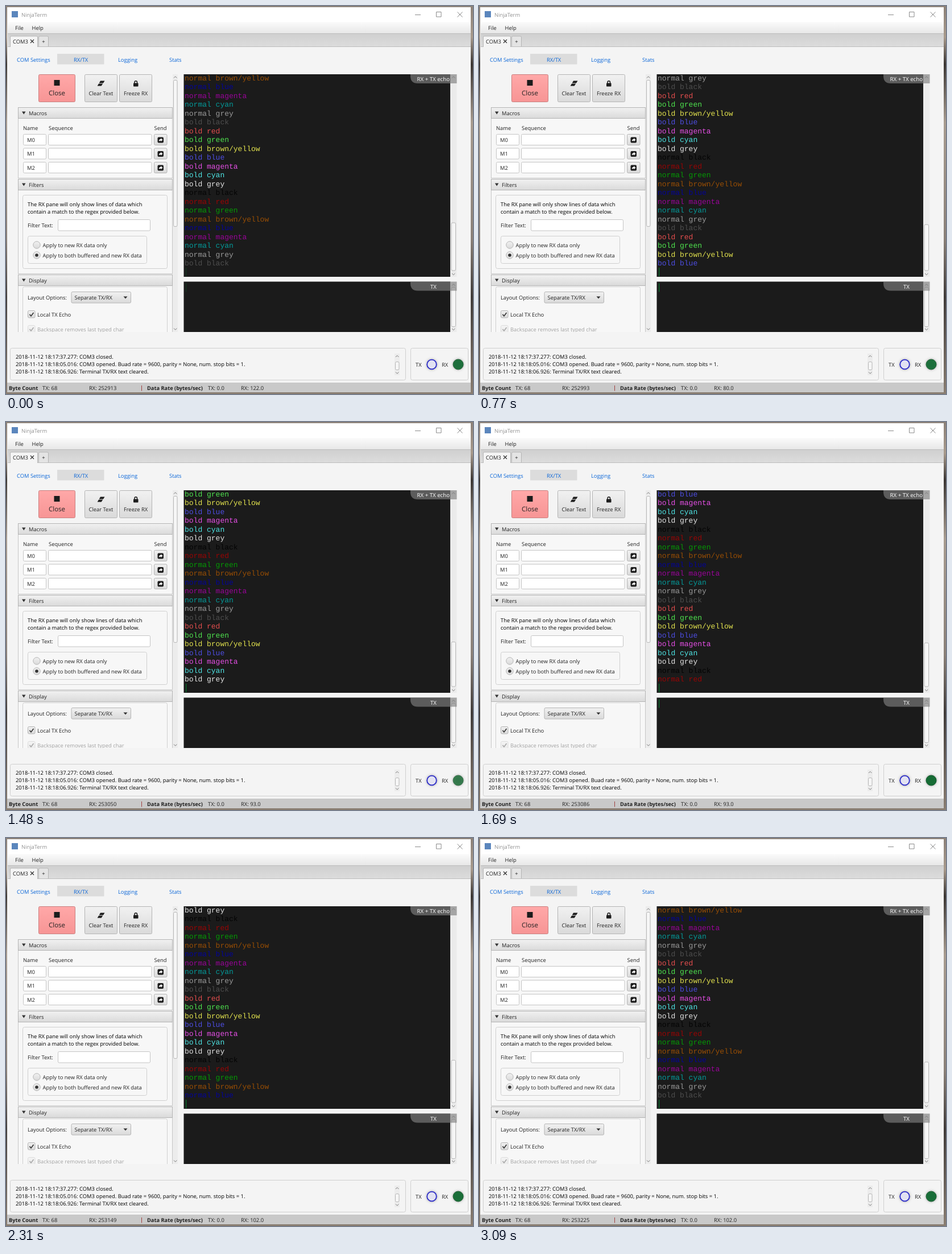
An HTML page for the animation above (3180 ms loop, 821x682 px).

```html
<!DOCTYPE html>
<html lang="en">
<head>
<meta charset="utf-8">
<title>NinjaTerm</title>
<style>
html, body { margin: 0; width: 100%; height: 100%; overflow: hidden; }
body > svg { display: block; }
text { font: 9.4px "Open Sans", "Noto Sans", sans-serif; fill: #222; text-rendering: geometricPrecision; white-space: pre; }
.mid { text-anchor: middle; }
.link { fill: #0a66d8; }
.dark { fill: #000; }
.bold { font-size: 9.25px; font-weight: 700; }
.tag { font-size: 9.7px; fill: #fff; }
#rows text { font: 13px "Liberation Mono", "Courier New", monospace; opacity: .88; }
.btn { fill: url(#btn); stroke: #b4b4b4; }
.field { fill: #fff; stroke: #c4c4c4; }
.box { fill: none; stroke: #cfcfcf; }
.thumb { fill: #f6f6f6; stroke: #b6b6b6; }
.arrow { fill: none; stroke: #777; }
.icon { fill: #1c1c1c; }
.caret { fill: #087a30; }
</style>
</head>
<body>
<svg id="stage" width="821" height="682" viewBox="0 0 821 682">
  <defs>
    <linearGradient id="desk" x2="0" y2="1">
      <stop stop-color="#8c8178"/><stop offset=".08" stop-color="#a89a8c"/>
      <stop offset=".15" stop-color="#3a3532"/><stop offset=".3" stop-color="#a89c90"/>
      <stop offset=".6" stop-color="#8a8078"/><stop offset=".75" stop-color="#3f3a38"/>
      <stop offset="1" stop-color="#8a7e72"/>
    </linearGradient>
    <linearGradient id="btn" x2="0" y2="1"><stop stop-color="#f1f1f1"/><stop offset="1" stop-color="#dadada"/></linearGradient>
    <linearGradient id="red" x2="0" y2="1"><stop stop-color="#ffa8a8"/><stop offset="1" stop-color="#f79595"/></linearGradient>
    <linearGradient id="menu" x2="0" y2="1"><stop stop-color="#fbfbfb"/><stop offset="1" stop-color="#e7e7e7"/></linearGradient>
    <linearGradient id="tabs" x2="0" y2="1"><stop stop-color="#cfcfcf"/><stop offset="1" stop-color="#dcdcdc"/></linearGradient>
    <filter id="glow" x="-50%" y="-50%" width="200%" height="200%">
      <feDropShadow dx="0" dy="0" stdDeviation="2" flood-color="#555" flood-opacity=".55"/>
    </filter>
  </defs>

  <!-- Window, title, menu and tabs -->
  <rect width="821" height="682" fill="url(#desk)"/>
  <rect x="2" y="2" width="815" height="677" fill="#f4f4f4"/>
  <rect x="3" y="3" width="814" height="25" fill="#fff"/>
  <rect x="10" y="9" width="11" height="11" fill="#5b86bd"/>
  <text x="27" y="18.5" style="fill:#8f8f8f">NinjaTerm</text>
  <path d="M719 15.5h10M756.500 10.500h8.500v8.500h-8.500zM793.500 10.500l9 9m0-9l-9 9" fill="none" stroke="#8a8a8a"/>
  <rect x="3" y="28" width="814" height="20" fill="url(#menu)"/>
  <text x="16" y="41.500">File</text><text x="45.500" y="41.500">Help</text>
  <rect x="3" y="48" width="814" height="23" fill="url(#tabs)"/>
  <path d="M3 48.500h814M3 71.500h814" stroke="#bcbcbc"/>
  <path d="M7.500 72v-17q0-2 2-2h44q2 0 2 2v17" fill="#f4f4f4" stroke="#b4b4b4"/>
  <path d="M57.500 71v-16q0-2 2-2h13q2 0 2 2v16" fill="#e4e4e4" stroke="#b4b4b4"/>
  <text x="12" y="65.500">COM3</text>
  <path d="M43 59l6 6m0-6l-6 6" stroke="#333" stroke-width="1.300"/>
  <text x="66" y="66" class="mid">+</text>
  <rect x="90" y="84" width="82.500" height="18.500" fill="#dcdcdc"/>
  <text class="link" x="19" y="97.500">COM Settings</text>
  <text class="link" x="119" y="97.500">RX/TX</text>
  <text class="link" x="197" y="97.500">Logging</text>
  <text class="link" x="287" y="97.500">Stats</text>

  <!-- Left panel, cut off at its lower edge -->
  <svg width="310" height="573">
    <rect x="57.500" y="120.500" width="64" height="48" rx="2" fill="url(#red)" stroke="#c98080"/>
    <rect class="btn" x="138.500" y="120.500" width="57" height="48" rx="2"/>
    <rect class="btn" x="199.500" y="120.500" width="57" height="48" rx="2"/>
    <path class="icon" d="M84.500 130h10v10h-10zM166 131.500h7.500l-2.500 4h-7.300zM163 136.500h7.300l-2.700 4h-7z"/>
    <rect class="icon" x="224" y="135.500" width="8.500" height="6" rx=".8"/>
    <path d="M226 136v-2a2.250 2.250 0 0 1 4.500 0v2" fill="none" stroke="#1c1c1c" stroke-width="1.500"/>
    <text class="mid" x="89.500" y="157" style="font-size:11.500px">Close</text>
    <text class="mid" x="167" y="156.500">Clear Text</text>
    <text class="mid" x="228" y="156.500">Freeze RX</text>
    <g id="panes"></g>
    <text x="30" y="217.500">Name</text><text x="75" y="217.500">Sequence</text><text x="260.500" y="217.500">Send</text>
    <g id="macros"></g>
    <rect class="box" x="29.500" y="332.500" width="254" height="129" rx="3"/>
    <text class="dark" x="38" y="351.500">The RX pane will only show lines of data which</text>
    <text class="dark" x="38" y="364.500">contain a match to the regex provided below.</text>
    <text x="38" y="389">Filter Text:</text>
    <rect class="field" x="91.500" y="375.500" width="162" height="19.500" rx="2"/>
    <rect class="box" x="38.500" y="404.500" width="209" height="48" rx="3"/>
    <circle class="btn" cx="54" cy="420" r="6.200"/><circle class="btn" cx="54" cy="438" r="6.200"/>
    <circle cx="54" cy="438" r="2.800" fill="#333"/>
    <text x="64.500" y="423.500">Apply to new RX data only</text>
    <text x="64.500" y="441.500">Apply to both buffered and new RX data</text>
    <rect class="box" x="29.500" y="493.500" width="254" height="110" rx="3"/>
    <text x="38" y="516">Layout Options:</text>
    <rect class="btn" x="115" y="502.500" width="104.500" height="19.500" rx="2"/>
    <text x="120.500" y="516">Separate TX/RX</text>
    <path d="M206.500 510.500h7l-3.500 4z" fill="#333"/>
    <g id="checks"></g>
    <rect x="293" y="120" width="9" height="453" fill="#ececec"/>
    <rect class="thumb" x="294.500" y="130.500" width="6.500" height="257" rx="2"/>
    <path class="arrow" d="M295 126.500l2.700-2.700 2.700 2.700M295 566.500l2.700 2.700 2.700-2.700"/>
  </svg>

  <!-- Terminals -->
  <rect x="312.500" y="120" width="469" height="356" fill="#1b1b1b"/>
  <rect x="312.500" y="484.500" width="469" height="88.500" fill="#1b1b1b"/>
  <g id="rows"></g>
  <rect class="caret" id="rxCaret" x="316" y="460" width="1.200" height="15"/>
  <rect class="caret" id="txCaret" x="316" y="487.500" width="1.200" height="15"/>
  <rect x="781" y="120" width="11.500" height="356" fill="#ebebeb"/>
  <rect x="781" y="484.500" width="11.500" height="88.500" fill="#ebebeb"/>
  <rect class="thumb" id="rxThumb" x="783" y="381" width="7.500" height="84" rx="2"/>
  <rect class="thumb" x="783" y="494.500" width="7.500" height="69" rx="2"/>
  <path class="arrow" d="M784 126.500l2.700-2.700 2.700 2.700M784 470l2.700 2.700 2.700-2.700M784 491.500l2.700-2.700 2.700 2.700M784 567l2.700 2.700 2.700-2.700"/>
  <path d="M711 120h81.500v16h-68.500q-13 0-13-13zM711 484.500h81.500v16h-68.500q-13 0-13-13z" fill="#808080" fill-opacity=".65"/>
  <text class="tag" x="780" y="132" text-anchor="end">RX + TX echo</text>
  <text class="tag mid" x="751.500" y="496.500">TX</text>

  <!-- Log, lamps and status bar -->
  <rect class="box" x="7.500" y="601.500" width="695" height="56" rx="3"/>
  <rect class="box" x="711.500" y="601.500" width="101" height="56" rx="3"/>
  <text class="dark" x="17" y="619.500">2018-11-12 18:17:37.277: COM3 closed.</text>
  <text class="dark" x="17" y="632.500">2018-11-12 18:18:05.016: COM3 opened. Buad rate = 9600, parity = None, num. stop bits = 1.</text>
  <text class="dark" x="17" y="645.500">2018-11-12 18:18:06.926: Terminal TX/RX text cleared.</text>
  <rect x="683" y="611" width="9" height="38" fill="#ececec"/>
  <rect class="thumb" x="684.500" y="625.500" width="6.500" height="14" rx="2"/>
  <path class="arrow" d="M685 617l2.700-2.700 2.700 2.700M685 643.500l2.700 2.700 2.700-2.700"/>
  <text x="720" y="633.500">TX</text><text x="766" y="633.500">RX</text>
  <circle cx="748.500" cy="630" r="8.300" fill="#e2e2f2" stroke="#2a2ac8" stroke-width="1.800" filter="url(#glow)"/>
  <g filter="url(#glow)"><circle id="lamp" cx="795" cy="630" r="9" fill="#126c34" stroke="#0e5a2a"/></g>
  <rect x="2" y="662" width="815" height="17" fill="#c9c9c9"/>
  <text class="bold" x="5" y="674.500">Byte Count</text><text x="64" y="674.500">TX: 68</text>
  <text id="count" x="146" y="674.500"></text>
  <path d="M238.500 667v9.500" stroke="#a04040"/>
  <text class="bold" x="248" y="674.500">Data Rate (bytes/sec)</text><text x="355" y="674.500">TX: 0.0</text>
  <text id="rate" x="413" y="674.500"></text>
</svg>
<script>
const $ = id => document.getElementById(id);
const LOOP = 3180, STEP = 77.3, LINE_MS = 195, LEAD = 55, ROWS = 22, FIRST = 8;

$('panes').innerHTML = [['Macros', 178, 303], ['Filters', 304, 471], ['Display', 472, 600]].map(([name, y, end]) => `
  <rect x="21.5" y="${y + .5}" width="271" height="${end - y - 1}" fill="#f7f7f7" stroke="#c6c6c6"/>
  <rect class="btn" x="21.5" y="${y + .5}" width="271" height="19"/>
  <path d="M28 ${y + 7.5}h6.500l-3.200 5z" fill="#333"/>
  <text x="40" y="${y + 13.5}">${name}</text>`).join('');

$('macros').innerHTML = [0, 1, 2].map(i => `<g transform="translate(0 ${225 + i * 24.5})">
  <rect class="field" x="30.500" y=".5" width="40" height="19" rx="2"/>
  <text x="37" y="13.500">M${i}</text>
  <rect class="field" x="74.500" y=".5" width="181.500" height="19" rx="2"/>
  <rect class="btn" x="260.500" y=".5" width="22.500" height="19" rx="2"/>
  <rect class="icon" x="266.500" y="5.500" width="10.500" height="10" rx="2"/>
  <path d="M269 13q-.5-4 3-4v-1.800l3.500 3-3.500 3v-1.800q-2-.2-3 1.600z" fill="#fff"/></g>`).join('');

$('checks').innerHTML = [['Local TX Echo', 542, 1], ['Backspace removes last typed char', 568, .4]].map(([label, y, alpha]) => `
  <g opacity="${alpha}"><rect class="btn" x="38.500" y="${y - 6.500}" width="12.500" height="12.500" rx="2"/>
  <path d="M41.500 ${y}l2.500 3 4.500-6" fill="none" stroke="#333" stroke-width="1.600"/>
  <text x="55" y="${y + 3.500}">${label}</text></g>`).join('');

// Sixteen terminal colours, in the order the device sends them
const names = ['black', 'red', 'green', 'brown/yellow', 'blue', 'magenta', 'cyan', 'grey'];
const palette = Array.from({length: 16}, (_, i) => {
  const bold = i > 7, low = bold ? 85 : 0, high = bold ? 255 : 170;
  const rgb = [1, 2, 4].map(bit => i & bit ? high : low);
  if (i === 3) rgb[1] = 85;
  return {text: (bold ? 'bold ' : 'normal ') + names[i % 8], fill: `rgb(${rgb})`, overhead: bold ? 9 : 7};
});
const lineAt = n => palette[(n + 32) % 16];

const rows = Array.from({length: ROWS}, (_, i) => {
  const row = document.createElementNS('http://www.w3.org/2000/svg', 'text');
  row.setAttribute('x', 314);
  row.setAttribute('y', 131 + i * 15.476);
  return $('rows').appendChild(row);
});

function draw() {
  const clock = performance.now() % LOOP;
  const t = STEP * Math.min(40, Math.floor((clock + 14) / STEP));
  const last = FIRST + Math.floor((t + LEAD) / LINE_MS);
  const age = (t + LEAD) % LINE_MS / LINE_MS;

  rows.forEach((row, i) => {
    const line = lineAt(last - ROWS + 1 + i);
    row.textContent = line.text;
    row.style.fill = line.fill;
  });

  let bytes = 252913;
  for (let n = FIRST + 1; n <= last; n++) bytes += lineAt(n).text.length + lineAt(n).overhead;
  $('count').textContent = 'RX: ' + bytes;
  const rate = t < 230 ? 122 : t < 1230 ? 80 : t < 2230 ? 93 : 102;
  $('rate').textContent = `RX: ${rate.toFixed(1)}`;

  const top = 381 + (last - FIRST) * .8;
  $('rxThumb').setAttribute('y', top);
  $('rxThumb').setAttribute('height', 465 - top);
  $('lamp').setAttribute('opacity', 1 - .22 * age);
  $('rxCaret').setAttribute('opacity', t < 500 ? .3 : 1);
  $('txCaret').setAttribute('opacity', t % 1000 >= 500 ? 1 : t < 70 ? .3 : 0);
  requestAnimationFrame(draw);
}
draw();
</script>
</body>
</html>
```
